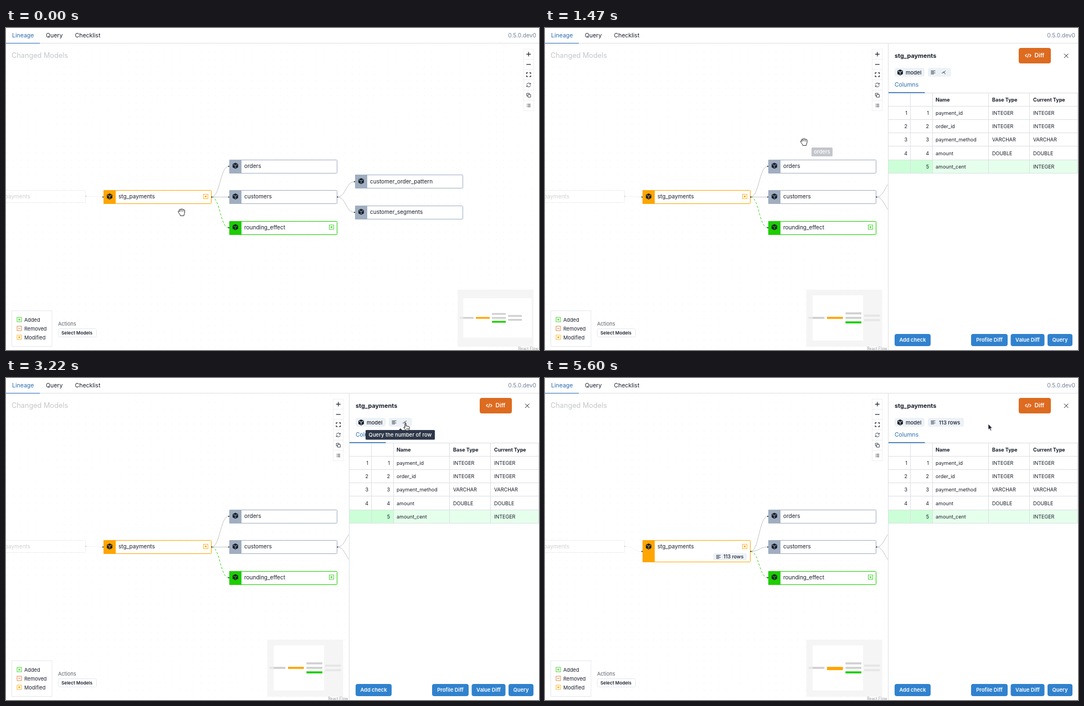
Write an HTML page that moves like this. It is 962 px wide and 582 px high and loops after 6160 ms.

```html
<!DOCTYPE html>
<html lang="en">
<head>
<meta charset="utf-8">
<title>Lineage</title>
<style>
  html, body { margin: 0; width: 100%; height: 100%; overflow: hidden; background: #fff; }
  svg { display: block; font-family: Inter, "Open Sans", sans-serif; font-size: 10px; fill: #1a202c; }
  .b { font-weight: 700; }
  .s { font-weight: 600; }
  .m { font-weight: 500; }
  .line { fill: none; stroke: #b1b1b7; stroke-width: .8; }
  .new { fill: none; stroke: #1dce00; stroke-width: .9; stroke-dasharray: 4 3; }
  .ico { fill: none; stroke: #1a202c; }
  .grid { fill: none; stroke: #dcdfe3; }
  .end { text-anchor: end; }
  .mid { text-anchor: middle; }
  .cursor { fill: #fff; stroke: #111; stroke-linejoin: round; }
</style>
</head>
<body>
<svg id="stage" width="962" height="582" viewBox="0 0 962 582"></svg>
<script>
const LOOP = 6160, STEP = 70, SIDE = 619.5;
const GRAY = '#a0aec0', ORANGE = '#ffa500', GREEN = '#1dce00', BLUE = '#2b6cb0', DARK = '#2d3748', PALE = '#edf2f7';

// Moments of the story
const HOVER = 140, OPEN = 630, LEAVE = 1120, PEEK = 1330, HINT = 2870, ASK = 3920, DONE = 4760;

// Drawing helpers
const text = (x, y, s, size = 10, cls = '', more = '') =>
  `<text x="${x}" y="${y}" font-size="${size}" class="${cls}" ${more}>${s}</text>`;
const rect = (x, y, w, h, fill, more = '') =>
  `<rect x="${x}" y="${y}" width="${w}" height="${h}" fill="${fill}" ${more}/>`;
const path = (d, cls = '', more = '') => `<path d="${d}" class="${cls}" ${more}/>`;
const group = (id, body, more = '') => `<g id="${id}" ${more}>${body}</g>`;
const dot = (x, y, id = '') => `<circle id="${id}" cx="${x}" cy="${y}" r="1.1"/>`;
const curve = (x1, y1, x2, y2) => {
  const c = (x1 + x2) / 2;
  return `M${x1} ${y1}C${c} ${y1} ${c} ${y2} ${x2} ${y2}`;
};

// The graph sits on a regular lattice of columns and rows
const W = 195, H = 25;
const model = (name, col, row, color = GRAY, kind = '') =>
  ({ name, color, kind, x: 176 + 227 * col, y: 305 + 55.5 * row });
const models = [
  model('raw_payments', -1, 0),
  model('stg_payments', 0, 0, ORANGE, 'mod'),
  model('orders', 1, -1),
  model('customers', 1, 0),
  model('rounding_effect', 1, 1, GREEN, 'add'),
  model('customer_order_pattern', 2, -.5),
  model('customer_segments', 2, .5)
];
const [raw, main, orders, customers, rounding, ...leaves] = models;

const cube = (x, y, gap) => `<g transform="translate(${x} ${y})">` +
  path('M0-5.4L5-3V2.8L0 5.4L-5 2.8V-3Z') +
  path('M-4.2-2.4L0-.5L4.2-2.4M0-.5V4.3', '', `fill="none" stroke="${gap}"`) + '</g>';

const rowsIcon = (x, y) => path(`M${x - 4} ${y - 2.8}h8m-8 1.9h5.5m-5.5 1.9h8m-8 1.9h5.5`, '',
  `fill="none" stroke="${DARK}" stroke-width=".9"`);

// Small status square: added, removed or modified
const mark = (x, y, kind) => {
  const color = { add: GREEN, del: '#dd6b20', mod: ORANGE }[kind];
  const inner = kind === 'mod' ? `<circle cx="${x}" cy="${y}" r="1.7" fill="${color}"/>`
    : path(`M${x - 2} ${y}h4` + (kind === 'add' ? 'm-2-2v4' : ''), '', `stroke="${color}" stroke-width=".9"`);
  return rect(x - 4, y - 4, 8, 8, '#fff', `stroke="${color}" stroke-width=".8"`) + inner;
};

const node = ({ name, x, y, color, kind }) => {
  const top = Math.round(y - 12);
  return rect(x + .5, top + .5, W - 1, H - 1, '#fff', `id="${name}-box" rx="1" stroke="${color}"`) +
    rect(x, top, 22, H, color, `id="${name}-tab" rx="1"`) + cube(x + 11, y - .5, color) +
    text(x + 27, y + 3.3, name) + (kind && mark(x + 184.5, y - .5, kind));
};

const tooltip = (id, x, y, w, h, s) =>
  group(id, rect(x, y, w, h, DARK, 'rx="1.5"') + text(x + w / 2, y + h / 2 + 3.4, s, 9.5, 'm mid', 'fill="#fff"'));

const badge = (x, y, w, h) => rect(x, y, w, h, PALE, 'rx="3.5"') + rowsIcon(x + 9.5, y + h / 2 + .2);
const bone = (x, y, w) => rect(x, y, w, 5.4, PALE, 'class="bone" rx="1"');

// The overview is the graph itself, scaled by k
const miniMap = (id, left, x0, k, width) => {
  const top = y => 524 + (y - 305.5) * k;
  const bars = models.map(m => rect(x0 + m.x * k, top(m.y - 12.5), W * k, H * k,
    m.color === GRAY ? '#d0d0d0' : m.color, `id="${id}-${m.name}"`)).join('');
  return group(id, rect(left, 473, 137, 103, '#fff') + bars +
    path(`M${left} 473h137v103h-137zM${x0} ${top(28)}v${554 * k}h${width * k}v${-554 * k}z`, '',
      'fill="#f0f0f0" fill-opacity=".68"'));
};

const controls = () => group('controls', [
  'M-4 0h8M0-4v8',
  'M-4 0h8',
  'M-3.7-1.4V-3.5H-1.4M1.4-3.5H3.7V-1.4M3.7 1.4V3.5H1.4M-1.4 3.5H-3.7V1.4',
  'M-3.5-.6A3.6 3.6 0 0 1 3-2M3.6-3.7V-1.4H1.3M3.5.6A3.6 3.6 0 0 1-3 2M-3.6 3.7V1.4H-1.3',
  'M-1.3-1.3H3.6V3.6H-1.3ZM-1.3 1.3H-3.5V-3.5H1.3V-1.3',
  'M-1.6-2.3H3.4M-1.6 0H3.4M-1.6 2.3H3.4M-3.4-2.3h.9M-3.4 0h.9M-3.4 2.3h.9'
].map((d, i) => {
  const y = 47.3 + 18.55 * i;
  return rect(934, y - 9.2, 18.5, 18.5, '#fefefe', 'stroke="#eee" stroke-width=".8"') +
    path(d, 'ico', `transform="translate(943.3 ${y})" stroke-width="${i < 3 ? 1.2 : .8}"`);
}).join(''));

const legend = () => rect(10.5, 511, 72.5, 64.5, '#fff', 'stroke="#e2e8f0"') +
  Object.entries({ add: 'Added', del: 'Removed', mod: 'Modified' }).map(([kind, s], i) =>
    mark(24, 527 + i * 16, kind) + text(33, 530.5 + i * 16, s, 9.2)).join('') +
  text(94, 538, 'Actions', 9.2, '', 'fill="#5b6068"') +
  rect(94.5, 543.5, 69, 15, '#fff', 'rx="3" stroke="#e2e8f0"') + text(100, 554, 'Select Models', 8.2, 's');

const canvas = () =>
  '<defs><pattern id="dots" width="13" height="13" patternUnits="userSpaceOnUse">' +
  '<circle cx="1" cy="5" r=".5" fill="#e2e2e4"/></pattern></defs>' +
  rect(0, 28, 962, 554, 'url(#dots)') +
  text(10, 53.5, 'Changed Models', 12.7, '', 'fill="#c4c6c9"') +
  group('upstream', path('', 'line', 'id="edge-in"') +
    rect(raw.x, 293.5, W - .5, 22, '#fff', `rx="1" stroke="${GRAY}"`) +
    text(44, 308.3, raw.name, 10, 'end') + dot(144.3, 304.3)) +
  [orders, customers, rounding].map(m => path('', m === rounding ? 'new' : 'line', `id="edge-${m.name}"`)).join('') +
  leaves.map(m => path(curve(customers.x + W, 305.5, m.x - 1, m.y + .5), 'line')).join('') +
  node(main) +
  group('node-load', badge(269, 316.5, 95.5, 13) + bone(288, 320.2, 72)) +
  group('node-rows', badge(303.5, 316.5, 61, 13) + text(322, 326.3, '113 rows', 9, 'm')) +
  models.slice(2).map(m => node(m) + dot(m.x - 1, m.y + .5)).join('') +
  dot(customers.x + W + .4, 305.5) + dot(main.x - 1, 305.5, 'port-in') + dot(main.x + W + .4, 305.5, 'port-out') +
  tooltip('tip-main', 235, 271, 76, 17.5, main.name) +
  tooltip('tip-orders', 481, 216, 38, 16, orders.name) +
  legend() + controls() +
  miniMap('map-wide', 815, 825.5, .128, 962) +
  miniMap('map-slim', 471.5, 483.1, .147, SIDE) +
  text(961, 582, 'React Flow', 7, 'end', 'id="credit" fill="#999"');

function table() {
  const [base, current, name, oldType, newType] = [654, 693, 705, 807, 881];
  const row = i => 117.5 + 24.1 * i;
  const heads = [[name, 'Name'], [oldType, 'Base Type'], [newType, 'Current Type']]
    .map(([x, s]) => text(x, 133.2, s, 9, 'b')).join('');
  const columns = { payment_id: 'INTEGER', order_id: 'INTEGER', payment_method: 'VARCHAR', amount: 'DOUBLE', amount_cent: 'INTEGER' };
  const cells = Object.entries(columns).map(([col, type], i) => {
    const y = row(i + 1) + 15.6;
    return (col === 'amount_cent' ? '' : text(base, y, i + 1, 9, 'end') + text(oldType, y, type, 9)) +
      text(current, y, i + 1, 9, 'end') + text(name, y, col, 9) + text(newType, y, type, 9);
  }).join('');
  const lines = [0, 1, 2, 3, 4, 5, 6].map(i => `M620 ${Math.floor(row(i)) + .5}H962`).join('') +
    [base + 5.5, name - 5.5, oldType - 6.5, newType - 6.5, 961.5].map(x => `M${x} 117.5V262`).join('');
  return rect(620, 238, 79.5, 24, '#ccffd8') + rect(699.5, 238, 262.5, 24, '#e6ffec') +
    path(lines, 'grid') + heads + cells;
}

const button = (x, w, s) =>
  rect(x, 553, w, 22, '#3182ce', 'rx="4"') + text(x + w / 2, 567.4, s, 9.35, 's mid', 'fill="#fff"');

const panel = () => group('panel',
  rect(619, 28, 343, 554, '#fff') + path('M619.5 28V582', 'grid') +
  text(631, 53.6, main.name, 10.9, 'b') +
  rect(855, 36, 58, 28, '#dd6b20', 'rx="4"') +
  path('M869.5 47.2L867 49.8L869.5 52.4M874.5 47.2L877 49.8L874.5 52.4M873 46.2L871 53.4', '',
    'fill="none" stroke="#fff" stroke-width="1.3"') +
  text(883.5, 53.4, 'Diff', 10.3, 's', 'fill="#fff"') +
  path('M937 46.5l7.5 7.5m0-7.5l-7.5 7.5', 'ico') +
  rect(631, 72, 54, 16, PALE, 'rx="4"') + cube(641, 80.3, PALE) + text(651, 83.6, 'model', 9.6, 'm') +
  group('ask', badge(691, 72, 41.8, 16) + path('M716 81.5l3.5-1 3.5-3.5m-4 1.5l3.5 5', 'ico', 'stroke-width=".8"')) +
  group('load', badge(691, 72, 101, 16) + bone(711, 77.6, 76)) +
  group('count', badge(691, 72, 65, 16) + text(711, 83.6, '113 rows', 9.5, 'm')) +
  text(631, 106.3, 'Columns', 10.4, '', 'id="tab"') +
  table() + rect(620, 116, 65.5, 1.5, BLUE, 'id="tab-line"') +
  button(631, 65, 'Add check') + button(769, 66, 'Profile Diff') + button(840.5, 61, 'Value Diff') + button(907, 45, 'Query') +
  group('tip-ask', path('M708.5 94.5l3.5-3.5 3.5 3.5z', '', `fill="${DARK}"`) +
    tooltip('tip-text', 649, 94, 125, 17.5, 'Query the number of row')));

const header = () => rect(0, 0, 962, 28, '#fff') + path('M0 27.5H962', 'grid') + rect(0, 27, 61, 1, BLUE) +
  text(11, 17, 'Lineage', 10.5, '', `fill="${BLUE}"`) + text(72, 17, 'Query', 10.5) + text(124.5, 17, 'Checklist', 10.5) +
  text(957, 16.8, '0.5.0.dev0', 10.2, 'end', 'fill="#718096"');

const cursors = () =>
  group('hand',
    path('M-5.2 1C-7.4-1.5-5.8-3.2-4-1L-4.4-4C-4.4-6-2.4-5.7-2.2-4C-2.2-6.6.2-6.6.4-4.8C.7-6.5 2.9-6.2 3-4C3.4-5.2 5.7-4.7 5.6-3L5.4 1.2C5.2 3.2 4 4.2 4 6.3H-2.3C-2.6 4.2-4 3-5.2 1Z') +
    path('M-2.2-4V-1M.4-4.6V-1M3-4V-1', '', 'stroke-width=".7"'), 'class="cursor" stroke-width=".9"') +
  group('finger',
    path('M-1 1C-1-.4 1-.4 1 1V5C2 4.2 3.2 4.6 3.3 5.4C4.2 4.8 5.2 5.2 5.4 6C6.4 5.6 7.2 6.2 7.2 7.2C7.2 10 6.3 10.5 6.2 13H.8C.4 11-2 9.8-3 7.8C-3.4 6.6-2 6.2-1 7.6Z') +
    path('M2 9v2.2M3.6 9v2.2M5.1 9v2.2', '', 'stroke-width=".7"'), 'class="cursor"') +
  group('arrow', path('M0 0V10.4L2.4 8.3L4.1 12.2L5.9 11.4L4.2 7.7H7.4Z', '', 'stroke="#fff" stroke-width=".7"'));

document.getElementById('stage').innerHTML = canvas() + panel() + header() + cursors();

// Motion helpers
const $ = id => document.getElementById(id);
const set = (id, props) => { for (const k in props) $(id).setAttribute(k, props[k]); };
const show = (id, amount) => set(id, { opacity: +amount });
const ramp = (t, from, to) => Math.min(1, Math.max(0, (t - from) / (to - from)));
const during = (t, on, off, fade = 200) => ramp(t, on, on + fade) - ramp(t, off, off + fade);
const mix = (a, b, u) => `rgb(${a.map((v, i) => Math.round(v + (b[i] - v) * u))})`;

const smooth = u => u * u * (3 - 2 * u);
const speedUp = u => u * u;
const slowDown = u => 1 - (1 - u) ** 3;
const moves = [
  { from: 0, to: 350, x: 307, y: 311, ease: slowDown },
  { from: 1050, to: 1470, x: 467.5, y: 206, ease: speedUp },
  { from: 1470, to: 2660, x: 721, y: 82, ease: slowDown },
  { from: 4060, to: 4970, x: 800, y: 83, ease: smooth }
];

function moveCursor(t) {
  let x = 317, y = 333;
  for (const m of moves) {
    const u = m.ease(ramp(t, m.from, m.to));
    x += (m.x - x) * u;
    y += (m.y - y) * u;
  }
  const kind = x < SIDE ? 'hand' : x > 695 && t < 4130 ? 'finger' : 'arrow';
  for (const id of ['hand', 'finger', 'arrow']) {
    show(id, id === kind);
    set(id, { transform: `translate(${x} ${y})` });
  }
}

function drawGraph(t) {
  const loading = t >= ASK, grow = loading ? 15 : 0, port = loading ? 313.5 : 305.5;
  set('stg_payments-box', { height: H - 1 + grow, fill: t >= HOVER && t < LEAVE + STEP ? PALE : '#fff' });
  set('stg_payments-tab', { height: H + grow });
  set('map-slim-stg_payments', { height: (H + grow) * .147 });
  set('port-in', { cy: port });
  set('port-out', { cy: port });
  set('edge-in', { d: curve(144.3, 304.3, main.x - 1, port) });
  for (const m of [orders, customers, rounding])
    set(`edge-${m.name}`, { d: curve(main.x + W, port, m.x - 1, m.y + .5) });
  show('upstream', .2 + .8 * during(t, STEP, LEAVE, 140));
}

function drawResult(t) {
  const asked = t >= ASK, done = t >= DONE;
  show('ask', !asked);
  for (const id of ['load', 'node-load']) show(id, asked && !done);
  for (const id of ['count', 'node-rows']) show(id, ramp(t, DONE - STEP, DONE + 420));
  const pulse = .5 - .5 * Math.cos(Math.PI * (t - ASK) / 800);
  const fill = mix([237, 242, 247], [160, 174, 192], pulse);
  document.querySelectorAll('.bone').forEach(el => el.setAttribute('fill', fill));
}

function render(t) {
  const open = t >= OPEN, tab = ramp(t, OPEN + 140, OPEN + 350);
  show('panel', open);
  show('map-wide', !open);
  show('map-slim', open);
  set('controls', { transform: `translate(${open ? SIDE - 963 : 0} 0)` });
  set('credit', { x: open ? SIDE - 2 : 961 });
  show('tab-line', tab);
  set('tab', { fill: mix([26, 32, 44], [43, 108, 176], tab) });

  show('tip-main', during(t, HOVER, LEAVE));
  show('tip-orders', .28 * during(t, PEEK, 1470, 140));
  show('tip-ask', during(t, HINT, 3780, 280));
  drawGraph(t);
  drawResult(t);
  moveCursor(t);
}

const start = performance.now();
function tick() {
  const t = (performance.now() - start) % LOOP;
  render(Math.floor(t / STEP) * STEP);
  requestAnimationFrame(tick);
}
tick();
</script>
</body>
</html>
```
